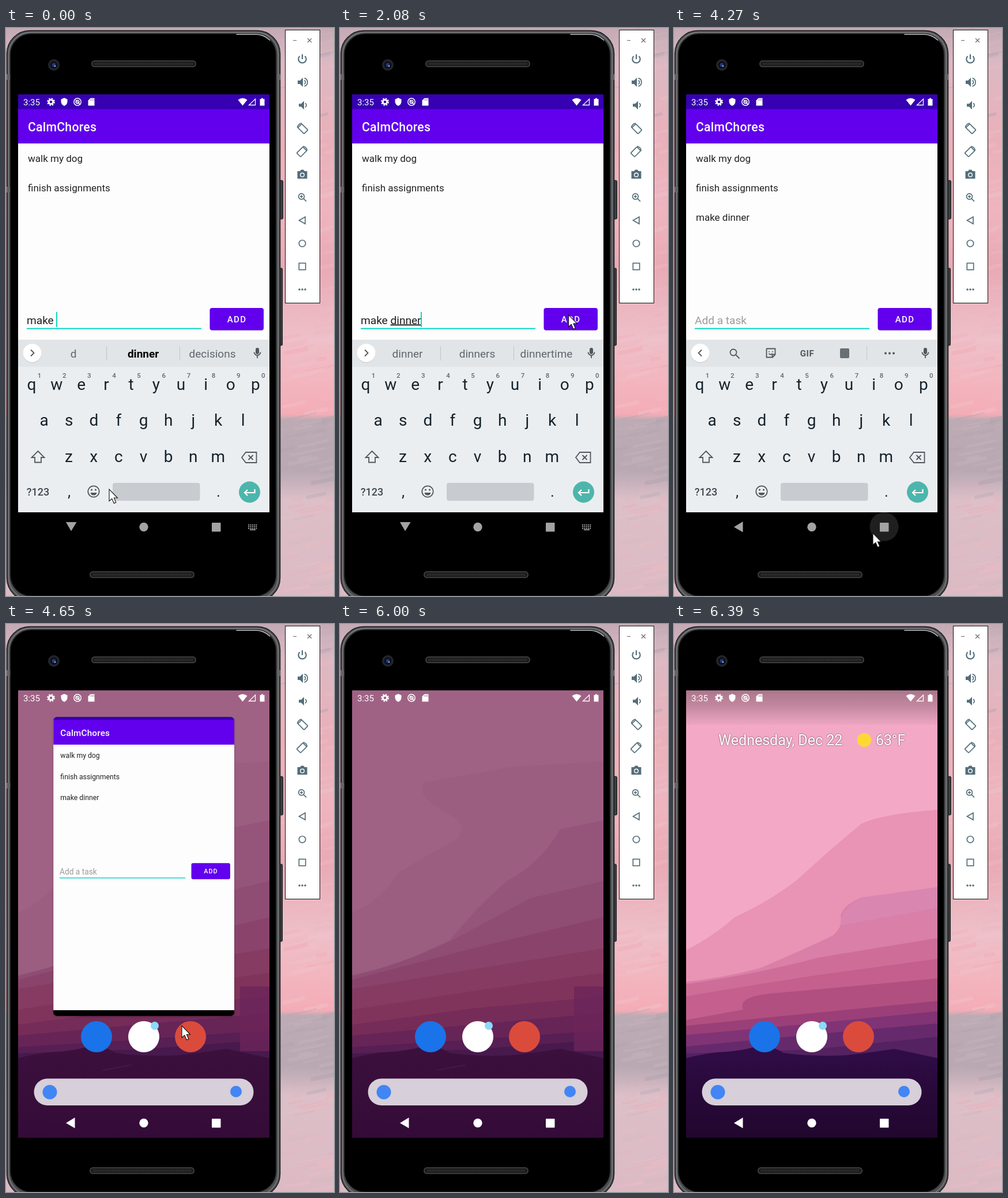
These frames come from a looping animation (569x984 px, 8 s). An HTML page:

```html
<!DOCTYPE html>
<html lang="en">
<head>
<meta charset="utf-8">
<title>To-do app</title>
<style>
html, body { margin: 0; width: 100%; height: 100%; overflow: hidden; }
svg { display: block; width: 569px; height: 984px; font-family: Roboto, sans-serif; }
text { white-space: pre; }
.mid { text-anchor: middle; }
.line { fill: none; stroke: #546e7a; stroke-width: 1.7; }
.key { fill: none; stroke: #50575d; stroke-width: 1.8; }
</style>
</head>
<body>
<svg id="stage" viewBox="0 0 569 984" xmlns="http://www.w3.org/2000/svg"></svg>
<script>
const LOOP = 8000;
const at = (x, y, body) => `<g transform="translate(${x} ${y})">${body}</g>`;
const rect = (x, y, w, h, fill, rx = 0, more = '') =>
  `<rect x="${x}" y="${y}" width="${w}" height="${h}" rx="${rx}" fill="${fill}" ${more}/>`;
const disc = (x, y, r, fill, more = '') => `<circle cx="${x}" cy="${y}" r="${r}" fill="${fill}" ${more}/>`;
const path = (d, fill, more = '') => `<path d="${d}" fill="${fill}" ${more}/>`;
const line = (d, cls = 'line', more = '') => `<path class="${cls}" d="${d}" ${more}/>`;
const text = (x, y, size, fill, str, more = '') =>
  `<text x="${x}" y="${y}" font-size="${size}" fill="${fill}" ${more}>${str}</text>`;
const mid = 'class="mid"';
const gradient = (id, stops) =>
  `<linearGradient id="${id}" x2="0" y2="1">` +
  stops.map(([o, c, a = 1]) => `<stop offset="${o}" stop-color="${c}" stop-opacity="${a}"/>`).join('') +
  '</linearGradient>';

let seed = 11;
const rnd = () => (seed = seed * 16807 % 2147483647) / 2147483647;

function backdrop() {
  let out = rect(0, 0, 569, 984, 'url(#paint)');
  const warm = ['#f3a6b2', '#eec3cb', '#e3b5c0', '#f5b9c1'];
  const cool = ['#aea1ac', '#c5b2bc', '#a89fab', '#cfb9c2'];
  for (let i = 0; i < 200; i++) {
    const x = 465 + rnd() * 95, y = rnd() * 984, len = 15 + rnd() * 50;
    const grey = y > 675 && y < 790 || y < 60 || rnd() < .1;
    const tint = (grey ? cool : warm)[Math.floor(rnd() * 4)];
    out += `<path d="M${x} ${y}q${len / 2} ${-len * .08} ${len} ${-len * .22}" fill="none" stroke="${tint}"
      stroke-width="${1.5 + rnd() * 6}" opacity="${.15 + rnd() * .25}"/>`;
  }
  return out;
}

function phone() {
  const grille = (x, y) => rect(x, y, 180, 10, '#1c1c1c', 4.5, 'stroke="#4a4a4a" stroke-width="1.5"') +
    `<path d="M${x + 5} ${y + 5}h170" stroke="#333" stroke-width="4" stroke-dasharray="1.5 1.5"/>`;
  return rect(475, 264, 5.5, 67, '#3c3f41', 2, 'stroke="#151515"') +
    rect(475, 416, 4.5, 134, '#3c3f41', 2, 'stroke="#151515"') +
    rect(1.5, 4.5, 474, 988, '#4d4f51', 40, 'stroke="#1c1d1e" stroke-width="1.5"') +
    rect(4.7, 7.5, 467.5, 982, 'none', 38, 'stroke="#7f8284" stroke-width="1.3"') +
    rect(7.5, 10, 461, 974, '#000', 36, 'stroke="#232425" stroke-width="1.5"') +
    path('M400 11H432A36 36 0 0 1 457.5 21', 'none', 'stroke="#c4c4c4" stroke-width="1.5" stroke-linecap="round"') +
    rect(1, 80, 6, 10, '#626567') + rect(1, 275, 6, 10, '#626567') + rect(470, 80, 6, 10, '#626567') +
    grille(149, 57) + grille(146, 942) +
    disc(83, 64, 10, '#242528') + disc(83, 64, 6.5, '#0c1120') + disc(83, 64, 3.2, '#25397c') + disc(85, 66, 1.3, '#9db4ef');
}

function sidebar() {
  const c = '#546e7a';
  const speaker = 'M-8-3h4l5-5v16l-5-5h-4z';
  const turn = '<rect class="line" x="-4.7" y="-7.5" width="9.4" height="15" rx="1" transform="translate(1 1) rotate(-45)"/>' +
    line('M-8.5-1A8 8 0 0 1-1-8.5');
  const icons = [
    line('M0-8.5V0M-4.5-5.2A6.7 6.7 0 1 0 4.5-5.2', 'line', 'style="stroke-width:2.2"'),
    path(speaker, c) + line('M3.5-3.5a4 4 0 0 1 0 7M3.5-7a7.2 7.2 0 0 1 0 14'),
    path('M-6-2.5h4l5-5v15l-5-5h-4z', c) + line('M5-3.5a4 4 0 0 1 0 7'),
    turn,
    `<g transform="scale(-1 1)">${turn}</g>`,
    path('M-8.5-5.5h4.5l2-2.5h4l2 2.5h4.5v13h-17z', c) + disc(0, 1, 4, '#fff') + disc(0, 1, 2.6, c),
    '<circle class="line" cx="-1.5" cy="-1.5" r="5"/>' + line('M2.2 2.2L7 7M-4-1.5h5M-1.5-4v5'),
    line('M5-6V6L-5.5 0z'),
    '<circle class="line" r="5.7"/>',
    '<rect class="line" x="-5.7" y="-5.7" width="11.4" height="11.4"/>',
    [-5, 0, 5].map(x => disc(x, 0, 1.8, c)).join('')
  ];
  return rect(484.5, 3.5, 60, 473, '#fff', 0, 'stroke="#111"') +
    line('M498 21.5h6M523 18l7 7M530 18l-7 7', 'line', 'style="stroke:#666;stroke-width:1.1"') +
    icons.map((d, i) => at(514, 54 + i * 39.9, d)).join('');
}

const FLOOR = 'V890H21z';
const HILLS = 'M21 752Q60 742 90 741Q130 738 152 728Q180 736 190 743Q240 750 300 747Q350 741 382 736Q420 744 457 752';
const layers = list => list.map(([c, d]) => path(d + FLOOR, c)).join('');

function home() {
  const bright = rect(21, 115, 436, 775, '#f3a9c6') + layers([
    ['#e993b5', 'M21 565Q70 540 105 508Q170 478 215 442Q260 400 325 346Q365 328 457 322'],
    ['#d97fa8', 'M21 620Q90 612 150 596Q230 562 275 540Q294 525 289 505Q295 486 325 474L457 456'],
    ['#ce6e98', 'M21 624Q150 605 250 578L457 544'],
    ['#c55f8d', 'M21 645Q120 628 250 608L457 580'],
    ['#b14f80', 'M21 686L120 668Q110 645 170 640L457 614'],
    ['#9a3f78', 'M21 696L200 678L457 653'],
    ['#803375', 'M21 712L220 694L457 671'],
    ['#662a6c', 'M21 732L240 711L457 692'],
    ['#542260', 'M21 744L240 737L457 715'],
    ['url(#nightB)', HILLS]
  ]) + path('M289 522Q286 495 325 474L457 456V492z', '#d986b1') +
    rect(21, 115, 436, 60, 'url(#shade)') +
    '<g style="filter:drop-shadow(0 0 1px #000a)">' +
    text(77, 210, 25, '#fff', 'Wednesday, Dec 22') + text(350, 210, 25, '#fff', '63°F') + '</g>' +
    disc(330, 201, 12, '#fdd835');
  const dim = rect(21, 115, 436, 775, '#9f6284') + layers([
    ['#9b5e81', 'M21 500Q70 480 100 432Q150 400 200 375Q225 350 190 330Q130 300 145 275L300 247L457 238'],
    ['#95557b', 'M21 608L98 590L190 548Q235 492 290 445Q350 412 382 355L457 340'],
    ['#8f4d74', 'M21 610Q120 585 200 545L330 475L457 445'],
    ['#8a446c', 'M21 616L230 562L457 508'],
    ['#863b62', 'M21 632L230 598L457 562'],
    ['#81345b', 'M21 668L230 636L457 604'],
    ['#752c58', 'M21 694L230 666L457 645'],
    ['#672457', 'M21 713L230 694L457 674'],
    ['#571f54', 'M21 733L230 720L457 704'],
    ['#47194d', 'M21 744L230 737L457 720'],
  ]) + rect(406, 628, 51, 112, '#6c2559', 0, 'opacity=".8"') + path(HILLS + FLOOR, 'url(#nightD)') +
    path('M168 773L217 764', 'none', 'stroke="#54204c"');
  return `${bright}<g id="dim">${dim}</g>` +
    disc(157, 715, 27, '#1a73e8') + disc(239, 715, 27, '#fff') + disc(320, 715, 27, '#db4b3c') +
    disc(258, 696, 7, '#8bd9fb') +
    rect(48.5, 787.5, 381, 46.5, '#d7cfd9', 23.2) + disc(76, 811, 12.5, '#4285f4') + disc(399, 810, 10, '#4285f4');
}

function keyboard() {
  const ink = '#15222b', grey = '#50575d';
  const row = (keys, x, y) => [...keys].map((k, i) => text(x + i * 43.15, y, 28, ink, k, mid)).join('');
  const mic = rect(-3, -9, 6, 11, grey, 3) + line('M-5.5-1.5a5.5 5.5 0 0 0 11 0M0 4v5', 'key');
  const dots = [-7, 0, 7].map(x => disc(x, 0, 2, grey)).join('');
  const tools = at(105, 564, '<circle class="key" cx="-2" cy="-2" r="5.5"/>' + line('M2 2l6.5 6.5', 'key')) +
    at(168, 563, line('M-7-7.5H7.5V3L3 7.5H-7.5V-7zM7 2.5H2.5V7M-3.5 1q3 3.5 6 0M-3-3v1.5M3-3v1.5', 'key')) +
    text(231, 568.5, 15, grey, 'GIF', mid + ' font-weight="700" letter-spacing=".6"') +
    rect(288, 555, 16, 17, '#686f75', 2) + rect(334, 551, 1, 25, '#c6cacd') + at(374, 563.5, dots);
  const words = [117, 238, 358].map(x => text(x, 570.5, 19, '#5f666c', '', mid + ' data-word')).join('') +
    rect(174, 551, 1, 25, '#bfc4c7') + rect(301, 551, 1, 25, '#bfc4c7');
  return rect(21, 540, 436, 299, '#ebeef1') + rect(21, 540, 436, 47, '#e1e5e8') +
    disc(45.5, 564, 16, '#0002') + disc(45.5, 563, 16, '#fff') +
    at(45.5, 563, `<g id="chevron">${line('M-2.5-5.5L3 0l-5.5 5.5', 'key')}</g>`) + at(436, 563, mic) +
    `<g id="words">${words}</g><g id="tools">${tools}</g>` +
    row('qwertyuiop', 44.5, 627) + row('asdfghjkl', 66, 689) + row('zxcvbnm', 109, 752) +
    [...'1234567890'].map((n, i) => text(58 + i * 43.15, 606, 11.5, '#5f666c', n, mid + ' font-weight="500"')).join('') +
    at(55.5, 743, line('M0-10L11 1H5.5V9.5H-5.5V1H-11z', 'key')) +
    at(422, 744, line('M-13 0L-6-9H12.5V9H-6zM-1.5-4l8 8M6.5-4l-8 8', 'key')) +
    text(55.5, 810, 18, '#3f484e', '?123', mid + ' font-weight="500"') +
    text(109.5, 812, 26, ink, ',', mid) + text(368.5, 812, 26, ink, '.', mid) +
    at(152, 803, '<circle class="key" r="9.7"/>' + disc(-3.5, -3, 1.6, grey) + disc(3.5, -3, 1.6, grey) +
      path('M-5.5 2h11a5.6 5.6 0 0 1-11 0', grey)) +
    rect(185, 788, 151.5, 31, '#c8ccd0', 4) + disc(422.5, 804, 18.5, '#4db6ac') +
    at(422.5, 804, line('M9-5V1H-8M-3.5-4L-8.5 1l5 5', 'key', 'style="stroke:#fff;stroke-width:2.2"'));
}

function app() {
  return rect(21, 115, 436, 724, '#fdfdfd') + rect(21, 839, 436, 51, '#000') +
    rect(21, 115, 436, 85, '#6200ee') + rect(21, 115, 436, 25.5, '#3700b3') +
    text(38, 178.5, 21.2, '#fff', 'CalmChores', 'font-weight="500" letter-spacing=".27"') +
    text(38, 232, 17, '#212121', 'walk my dog') + text(38, 283, 17, '#212121', 'finish assignments') +
    text(38, 334, 17, '#212121', 'make dinner', 'id="added"') +
    text(36, 512.5, 19.1, '#9b9b9b', 'Add a task', 'id="hint"') +
    text(36, 512.5, 19.1, '#1d1d1d', '<tspan id="done"></tspan><tspan id="typing" text-decoration="underline"></tspan>') +
    rect(36, 519.7, 303, 2, '#08d6c4') + rect(36, 492, 2, 26, '#08d6c4', 0, 'id="caret"') +
    rect(354, 486.5, 93, 38, '#0003', 4) + rect(353.5, 485, 93.5, 38.5, '#6200ee', 4, 'id="button"') +
    text(400.5, 510, 15, '#fff', 'ADD', mid + ' font-weight="500" letter-spacing="1.3"') +
    `<g id="keys">${keyboard()}</g>`;
}

function statusBar() {
  const w = '#fff';
  return text(30, 133.8, 15, w, '3:35') +
    at(78, 128, `<circle r="3.7" fill="none" stroke="${w}" stroke-width="2.8"/>
      <circle r="5.8" fill="none" stroke="${w}" stroke-width="2.2" stroke-dasharray="2.6 1.95"/>`) +
    at(101, 128, path('M0-7L5.5-4.6V0Q5 5 0 7Q-5 5-5.5 0V-4.6z', w)) +
    at(124, 128, `<g fill="none" stroke="${w}" stroke-width="1.5"><circle r="6.2"/><circle r="2.8"/><path d="M-3-3l8 8"/></g>`) +
    at(148, 128, path('M-1.5-6.5H5.5V6.5H-5.5V-2.5z', w) + path('M-1-5v3M1.5-5v3M4-5v3', 'none', 'stroke="#888"')) +
    path('M402.5 124.5Q410.5 118.5 418.5 124.5L410.5 134.5z', w) +
    path('M432.5 123V133.5H421.5z', 'none', `stroke="${w}" stroke-width="1.3"`) +
    path('M440.5 123h2.5v-1.5h3V123h2.5v11.5h-8z', w);
}

function navBar() {
  let dots = '';
  for (let i = 0; i < 15; i++) dots += rect(420 + i % 5 * 3.3, 860 + Math.floor(i / 5) * 3, 2, 1.8, '#aaa');
  return disc(364.5, 864, 25, '#fff', 'id="ripple"') +
    '<g id="nav">' + path('M104 856H122.5L113 871.5z', 'inherit', 'id="down"') +
    path('M119.5 855V873.5L104 864.5z', 'inherit', 'id="back"') +
    disc(239, 864.5, 7.7, 'inherit') + rect(357, 857, 15.5, 15.5, 'inherit', 1) + '</g>' +
    `<g id="imeIcon">${dots}${rect(423, 868.5, 10, 1.6, '#aaa')}</g>`;
}

const stage = document.getElementById('stage');
stage.innerHTML = '<defs>' +
  gradient('paint', [[0, '#c3aab4'], [.06, '#dbb9c3'], [.2, '#eab0ba'], [.32, '#efb5bf'], [.42, '#e8aab5'], [.55, '#eec0c9'],
    [.62, '#f3b5be'], [.68, '#f4adb7'], [.69, '#bcabb4'], [.78, '#b9a8b2'], [.83, '#dcbfc8'], [1, '#dcbac4']]) +
  gradient('shade', [[0, '#000', .3], [.45, '#000', .2], [1, '#000', .02]]) +
  gradient('nightB', [[0, '#310d49'], [.5, '#28093a'], [1, '#21072d']]) +
  gradient('nightD', [[0, '#3c103d'], [1, '#340b38']]) +
  '<clipPath id="screen"><rect x="21" y="115" width="436" height="775"/></clipPath>' +
  '<clipPath id="crop"><rect id="cropBox" x="21" width="436"/></clipPath></defs>' +
  backdrop() + phone() + sidebar() +
  `<g clip-path="url(#screen)">${home()}` +
  '<rect id="shadow" opacity=".3" style="filter:blur(1.5px)"/>' +
  `<g id="app" clip-path="url(#crop)">${app()}</g>` +
  disc(239, 0, 0, '#3ddc84', 'id="badge"') + statusBar() + navBar() + '</g>' +
  path('M0 0V20.5L4.8 16.3L8.3 24.5L11.8 23L8.4 15H14.5z', '#fff', 'id="mouse" stroke="#111" stroke-width="1.1"');

const $ = id => document.getElementById(id);
const wordEls = [...document.querySelectorAll('[data-word]')];
const pen = document.createElement('canvas').getContext('2d');

// card: scale, vertical shift, crop top, crop bottom
const FULL = [1, 0, 115, 890], small = y => [.63, y, 139.7, 836.5];
const steps = [
  [0, { done: 'make ', typing: '', words: 'd,dinner,decisions', bold: 1, caret: 1, mouse: [179, 799], card: FULL, keys: 1,
        tools: 0, added: 0, button: '#6200ee', ripple: 0, ime: 1, badge: 0, open: 1, dim: 1 }],
  [150, { typing: 'd', words: 'di,dinner,did' }],
  [430, { typing: 'di', words: 'din,dinner,dining' }],
  [550, { typing: 'din', words: 'dinn,dinner,dinning' }],
  [700, { typing: 'dinn', words: 'dinne,dinner,dinners' }],
  [820, { typing: 'dinner', words: 'dinner,dinners,dinnertime', bold: 0 }],
  [1390, { caret: 0, mouse: [190, 799] }],
  [1540, { mouse: [302, 643] }],
  [1680, { mouse: [362, 556] }],
  [1810, { mouse: [388, 500], caret: 1 }],
  [1930, { mouse: [391.5, 491.5] }],
  [2080, { mouse: [396.5, 497] }],
  [2360, { caret: 0, button: '#7420f0' }],
  [2500, { done: '', typing: '', caret: 1, added: 1, button: '#7f35f1' }],
  [2620, { button: '#6200ee' }],
  [2770, { tools: 1 }],
  [3050, { caret: 0 }],
  [3200, { mouse: [398, 565] }],
  [3320, { mouse: [399.5, 627] }],
  [3470, { mouse: [354.5, 787], caret: 1 }],
  [3620, { mouse: [341.5, 862] }],
  [3770, { mouse: [345, 875] }],
  [4030, { caret: 0, ripple: .12 }],
  [4150, { ripple: .2 }],
  [4270, { ripple: .12, ime: 0 }],
  [4510, { keys: 0, ripple: 0 }],
  [4650, { card: [.72, 65, 133.3, 852.8], mouse: [305, 696], open: 0 }],
  [4780, { card: small(89), mouse: [257, 553] }],
  [4920, { badge: 9, mouse: [250, 520] }],
  [5050, { badge: 18, mouse: [248, 503] }],
  [5170, { badge: 23, mouse: [247.5, 495] }],
  [5320, { mouse: [249, 494.5] }],
  [5590, { card: small(39), mouse: [228.5, 360] }],
  [5720, { card: small(-110), mouse: [222, 225] }],
  [6000, { card: null, badge: 0, mouse: null }],
  [6120, { dim: .7 }],
  [6240, { dim: .35 }],
  [6390, { dim: 0 }]
];

const show = (id, on) => $(id).setAttribute('visibility', on ? 'inherit' : 'hidden');
const set = (id, attrs) => { for (const k in attrs) $(id).setAttribute(k, attrs[k]); };

function placeCard([k, y, top, bottom]) {
  const x = 239.3 - 239.3 * k;
  set('app', { transform: `translate(${x} ${y}) scale(${k})` });
  set('cropBox', { y: top, height: bottom - top, rx: k < 1 ? 9 : 0 });
  set('shadow', { x: x + 21 * k, y: top * k + y + 1, width: 436 * k, height: (bottom - top) * k, rx: 6 });
  set('badge', { cy: top * k + y + 1 });
}

function draw(s) {
  $('done').textContent = s.done;
  $('typing').textContent = s.typing;
  show('hint', !s.done);
  show('added', s.added);
  show('caret', s.caret);
  pen.font = '19.1px Roboto, sans-serif';
  set('caret', { x: 36 + Math.max(0, pen.measureText(s.done + s.typing).width - .6) });
  set('button', { fill: s.button });

  show('keys', s.keys);
  show('words', !s.tools);
  show('tools', s.tools);
  set('chevron', { transform: `scale(${s.tools ? -1 : 1} 1)` });
  s.words.split(',').forEach((w, i) => {
    const strong = s.bold && i === 1;
    wordEls[i].textContent = w;
    wordEls[i].setAttribute('font-weight', strong ? 700 : 400);
    wordEls[i].setAttribute('fill', strong ? '#000' : '#5f666c');
  });

  show('app', s.card);
  show('shadow', s.card);
  if (s.card) placeCard(s.card);
  set('badge', { r: s.badge });
  set('dim', { opacity: s.dim });

  set('nav', { fill: s.open ? '#a3a3a3' : '#fff' });
  show('down', s.ime);
  show('back', !s.ime);
  show('imeIcon', s.ime);
  set('ripple', { opacity: s.ripple });
  show('mouse', s.mouse);
  if (s.mouse) set('mouse', { transform: `translate(${s.mouse})` });
}

const start = performance.now();
let last = -1;
function tick() {
  const t = (performance.now() - start) % LOOP;
  const n = steps.filter(([ms]) => ms <= t).length;
  if (n !== last) {
    draw(Object.assign({}, ...steps.slice(0, n).map(step => step[1])));
    last = n;
  }
  requestAnimationFrame(tick);
}
tick();
</script>
</body>
</html>
```
